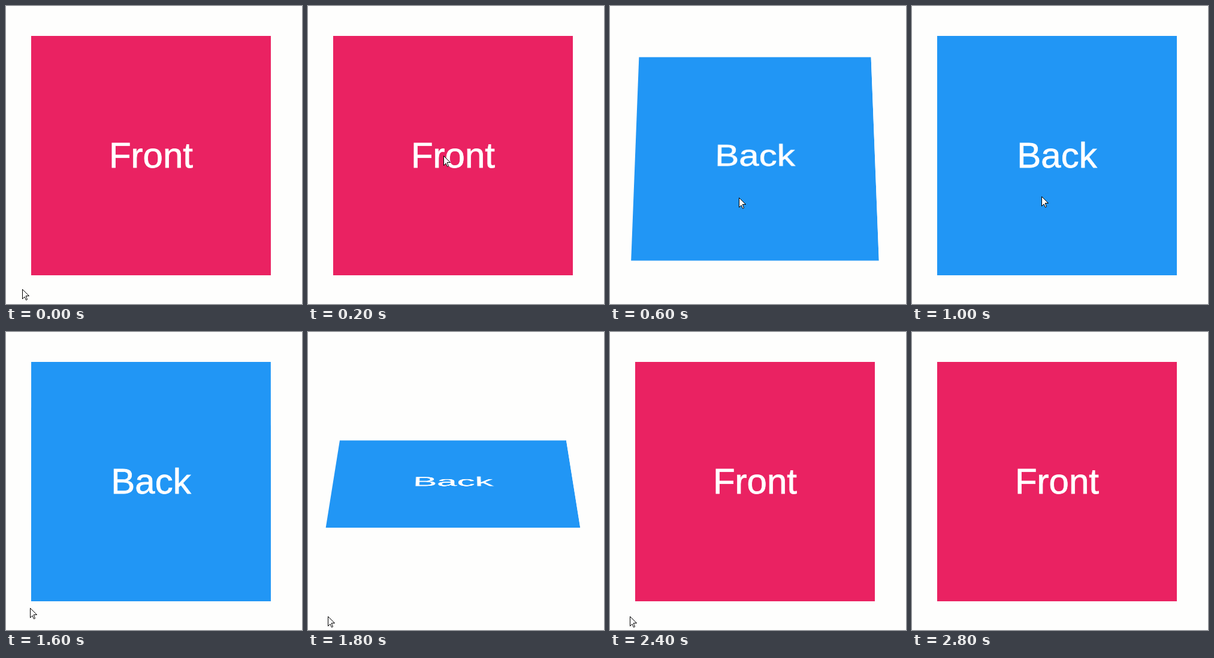
Write an HTML page that moves like this. It is 494 by 498 pixels and loops after 3800 ms.

```html
<!DOCTYPE html>
<html lang="en">
<head>
<meta charset="utf-8">
<title>Card flip</title>
<style>
  html, body { margin: 0; width: 100%; height: 100%; overflow: hidden; background: #fefefd; }
  #card { position: absolute; left: 42px; top: 50px; width: 400px; height: 400px; transform-style: preserve-3d; }
  .face {
    position: absolute; inset: 0; backface-visibility: hidden;
    font: 60px/400px "Liberation Sans", Arial, sans-serif; text-align: center;
    color: #fff; -webkit-text-stroke: .8px #fff;
  }
  .front { background: #ea2262; }
  .back { background: #2196f5; transform: rotateX(180deg); }
  #cursor { position: absolute; left: 0; top: 0; }
</style>
</head>
<body>
<div id="card">
  <div class="face front">Front</div>
  <div class="face back">Back</div>
</div>
<svg id="cursor" width="13" height="20">
  <path d="M.5 .5v16l3.5-3.5 2.5 5.5 2-1-2.3-6h5.3z" fill="#fff" stroke="#000"/>
</svg>
<script>
const LOOP = 3800, STEP = 200, LEAVE = 2800;
const card = document.getElementById('card');
const cursor = document.getElementById('cursor');

// Pointer route: time in ms, then the tip of the arrow.
const route = [
  [0, 27, 473], [200, 226, 250], [400, 195, 339], [600, 215, 320], [800, 216, 318],
  [1200, 216, 318], [1600, 40, 461], [1800, 33, 475], [2400, 33, 475], [2600, 37, 480]
];

// Smooth rise from 0 to 1 between two times.
function ease(time, from, to) {
  const p = Math.min(1, Math.max(0, (time - from) / (to - from)));
  return p * p * (3 - 2 * p);
}

function pointerAt(time) {
  const next = route.findIndex(([t]) => t > time);
  if (next < 0) return route[route.length - 1].slice(1);
  const [t0, x0, y0] = route[next - 1], [t1, x1, y1] = route[next];
  const p = (time - t0) / (t1 - t0);
  return [x0 + (x1 - x0) * p, y0 + (y1 - y0) * p].map(Math.round);
}

function draw(time) {
  const angle = 180 * (ease(time, 223, 738) - ease(time, 1589, 2091));
  card.style.transform = `perspective(3200px) rotateX(${-angle}deg)`;
  const [x, y] = pointerAt(time);
  cursor.style.transform = `translate(${x}px, ${y}px)`;
  cursor.style.visibility = time < LEAVE ? 'visible' : 'hidden';
}

// The picture advances in whole steps.
const start = performance.now();
function tick() {
  const time = (performance.now() - start) % LOOP;
  draw(Math.floor(time / STEP) * STEP);
  requestAnimationFrame(tick);
}
tick();
</script>
</body>
</html>
```
